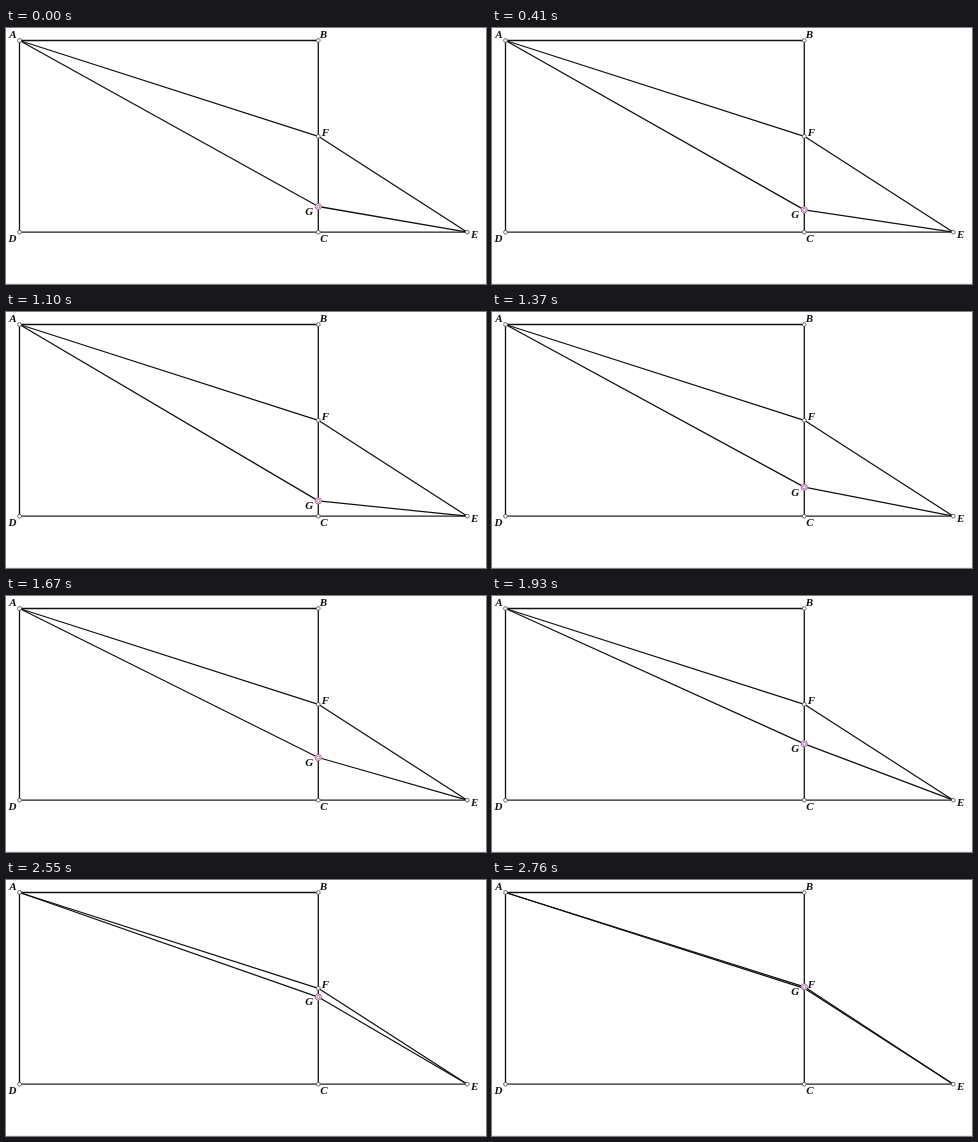
Animation, 480 px wide and 256 px high, one loop 2830 ms. Source, as an HTML page with a canvas:

```html
<!DOCTYPE html>
<html lang="en">
<head>
<meta charset="utf-8">
<title>Moving point on a rectangle side</title>
<style>
  html, body { margin: 0; width: 100%; height: 100%; overflow: hidden; background: #fff; }
  canvas { display: block; }
</style>
</head>
<body>
<canvas id="stage" width="480" height="256"></canvas>
<script>
const ctx = document.getElementById('stage').getContext('2d');

const LOOP = 2830;
const HOLD = 350;
const STEP_MS = 70;
const SHORT_MS = 60;
const SHORT_STEPS = [3, 6, 14, 30];
const LAST_STEP = 36;
const START_Y = 178.5;
const STEP_Y = 3.42;

const A = [13.5, 12.5], B = [312.3, 12.5], C = [312.3, 204.2];
const D = [13.5, 204.2], E = [461.3, 204.2], F = [312.3, 108.3];

function stepAt(time) {
  let step = 0;
  let end = HOLD;
  while (time >= end && step < LAST_STEP) {
    step++;
    end += SHORT_STEPS.includes(step) ? SHORT_MS : STEP_MS;
  }
  return step;
}

// The point slides down to C, bounces, and rises to F.
function pointY(step) {
  const y = START_Y + step * STEP_Y;
  return y > C[1] ? 2 * C[1] - y : y;
}

function line(points, width = 1.3, color = '#111') {
  ctx.beginPath();
  points.forEach(p => ctx.lineTo(...p));
  ctx.lineWidth = width;
  ctx.strokeStyle = color;
  ctx.stroke();
}

function ring([x, y], radius, color, width) {
  ctx.beginPath();
  ctx.arc(x, y, radius, 0, Math.PI * 2);
  ctx.fillStyle = '#fff';
  ctx.fill();
  ctx.lineWidth = width;
  ctx.strokeStyle = color;
  ctx.stroke();
}

function label(text, x, y) {
  ctx.fillStyle = '#111';
  ctx.fillText(text, x, y + 3.6);
}

function draw(time) {
  const G = [C[0], pointY(stepAt(time))];
  ctx.fillStyle = '#fff';
  ctx.fillRect(0, 0, 480, 256);
  ctx.fillStyle = '#ececec';
  ctx.fillRect(0, 255, 480, 1);

  ctx.lineJoin = 'round';
  line([D, A, B, C]);
  line([D, E], 1.2, '#222');
  line([A, F, E]);
  line([A, G, E]);

  [A, B, C, D, E, F].forEach(p => ring(p, 1.9, '#444', 0.8));
  ring(G, 3.1, '#b45aa8', 1);
  ring(G, 1.6, '#75506f', 0.7);

  ctx.font = 'italic bold 11px "Liberation Serif", "Times New Roman", serif';
  ctx.textAlign = 'center';
  label('A', 7, 6);
  label('B', 317.3, 6);
  label('C', 317.8, 210.3);
  label('D', 6.5, 210.3);
  label('E', 468.7, 206.3);
  label('F', 319.3, 104);
  label('G', 303.3, G[1] + 4.8);
}

const start = performance.now();
function tick() {
  draw((performance.now() - start) % LOOP);
  requestAnimationFrame(tick);
}
tick();
</script>
</body>
</html>
```
